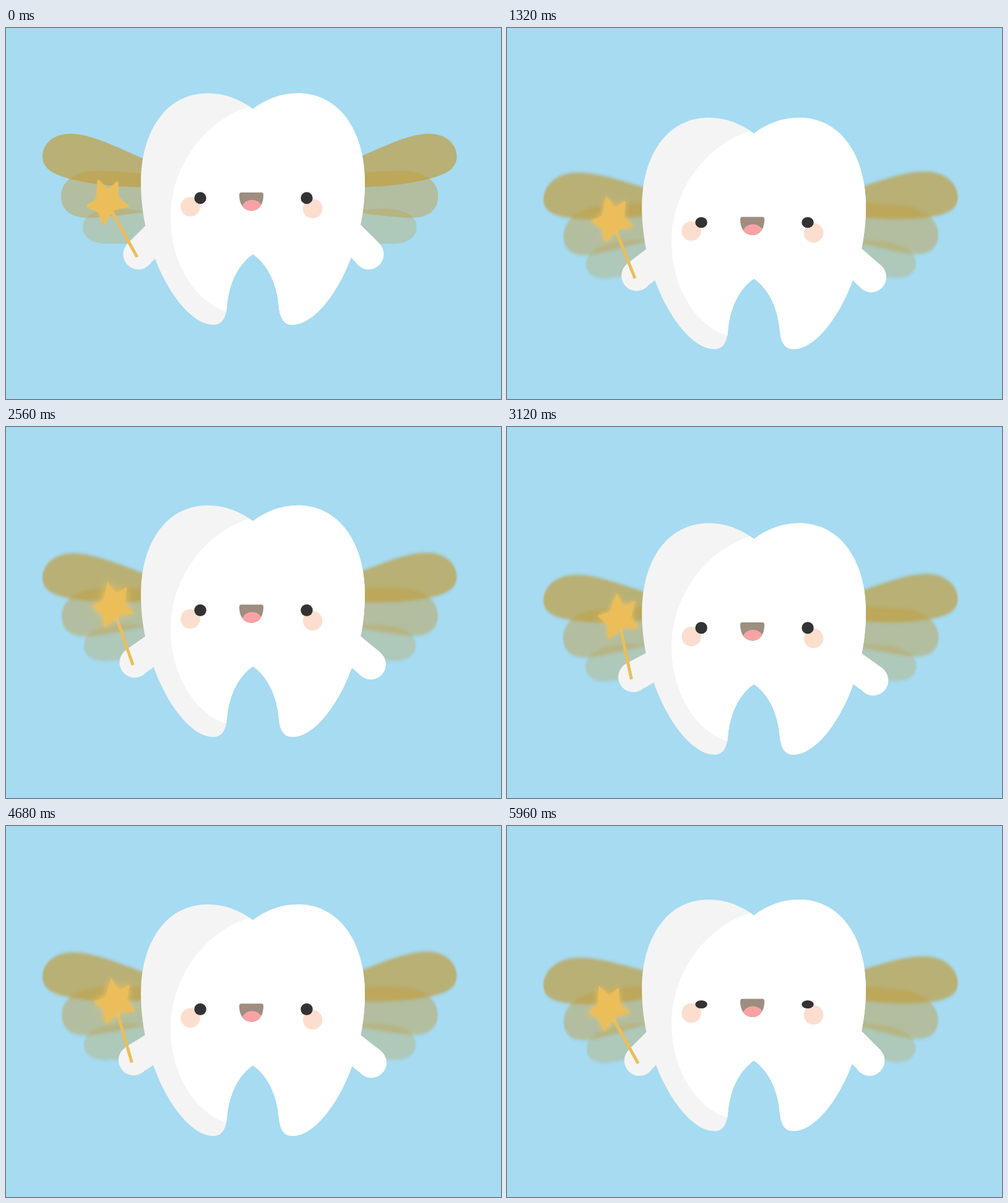
Write an HTML page that moves like this. It is 800 by 600 pixels and loops after 6 s.

```html
<!DOCTYPE html>
<html lang="en">
<head>
<meta charset="utf-8">
<title>Tooth fairy</title>
<style>
  html, body { margin: 0; width: 100%; height: 100%; overflow: hidden; background: #a6dbf1; }
  svg { display: block; width: 100vw; height: 100vh; }
</style>
</head>
<body>
<svg viewBox="0 0 800 600">
  <defs>
    <filter id="soft" x="-20%" y="-20%" width="140%" height="140%" color-interpolation-filters="sRGB">
      <feGaussianBlur id="blur" stdDeviation="0"/>
    </filter>
    <path id="tooth" d="M399 131C420 115 445 105.500 472 105.500C538 105.500 580 165 580 250
      C580 370 513 480 463 480C448 480 443 468 441 452C438 410 420 380 399 366
      C378 380 360 410 357 452C355 468 350 480 335 480C285 480 218 370 218 250
      C218 165 260 105.500 326 105.500C353 105.500 378 115 399 131Z"/>
    <path id="mouth" d="M380 266H413Q416 266 416 270C416 286 408 295.500 397 295.500
      C385 295.500 377 286 377 270Q377 266 380 266Z"/>
    <clipPath id="inTooth"><use href="#tooth"/></clipPath>
    <clipPath id="inMouth"><use href="#mouth"/></clipPath>
    <g id="wing" fill="#c09c3c">
      <path opacity=".3" d="M235 301C215 294 195 292 175 292C145 293 124 303 124 322C124 339 140 349 162 349H235Z"/>
      <path opacity=".45" d="M235 238C200 232 170 231 142 231C108 233 89 250 89 272C89 295 106 307 132 307C165 306 195 301 235 297Z"/>
      <path opacity=".685" d="M235 217C190 198 140 171 104 171C76 171 59 188 59 208C59 228 78 238 108 245C145 254 185 258 235 257Z"/>
    </g>
    <g id="arm">
      <path d="M196 349L228 317L262 350L236 378Z"/>
      <circle cx="214" cy="366" r="24.500"/>
    </g>
  </defs>

  <g id="fairy">
    <g filter="url(#soft)"><g id="wingL"><use href="#wing"/></g></g>
    <g filter="url(#soft)"><g id="wingR"><use href="#wing" transform="matrix(-1 0 0 1 787.500 0)"/></g></g>
    <g id="armR" fill="#fff"><use href="#arm" transform="matrix(-1 0 0 1 800 0)"/></g>
    <g id="armL">
      <use href="#arm" fill="#f4f4f4"/>
    </g>
    <use href="#tooth" fill="#f4f4f4"/>
    <path clip-path="url(#inTooth)" fill="#fff" d="M393 127C320 150 266 225 266 305C266 385 310 445 356 458L400 500H600V90H399Z"/>
    <g id="wand" fill="#ebbe59" stroke="#ebbe59" stroke-linejoin="round">
      <path stroke-width="5" d="M212 370.500L170 295"/>
      <path id="star" stroke-width="1.500" d="M149 246L165 262L180 249L181 275L198 288L174 294L157 318L150 297L131 288L147 277Z"/>
    </g>
    <g fill="#fcdecf">
      <circle cx="298" cy="289" r="15.800"/>
      <circle cx="495.500" cy="292" r="15.800"/>
    </g>
    <g fill="#333">
      <ellipse class="eye" cx="314" cy="275" rx="9.700"/>
      <ellipse class="eye" cx="486" cy="275" rx="9.700"/>
    </g>
    <use href="#mouth" fill="#9d8e80"/>
    <ellipse cx="397.500" cy="291" rx="16" ry="13" fill="#f7a3a6" clip-path="url(#inMouth)"/>
  </g>
</svg>
<script>
  const LOOP = 6000, BOB = 2120, WAVE = 2000, GLOW = 1800;
  const $ = id => document.getElementById(id);
  const eyes = document.querySelectorAll('.eye');
  const put = (id, value) => $(id).setAttribute('transform', value);

  // Sine ease from 0 to 1 between two times
  const ease = (t, from, to) => {
    const x = Math.min(1, Math.max(0, (t - from) / (to - from)));
    return (1 - Math.cos(Math.PI * x)) / 2;
  };

  // Shear with a slight turn: the tips sink, the lower wings draw in
  const sink = (id, q, slope, pivot, turn) =>
    put(id, `matrix(1 ${slope * q} ${turn * q} 1 ${-turn * q * 209} ${-slope * q * pivot})`);

  function draw(t) {
    const p = t % BOB, w = t % WAVE;
    put('fairy', `translate(0 ${50 * (ease(p, 0, 970) - ease(p, 970, BOB))})`);

    const lag = (p + BOB - 330) % BOB;
    const flap = .38 + .62 * (ease(lag, 0, 1670) - ease(lag, 1670, BOB));
    const q = Math.min(flap, t * .00069);
    sink('wingL', q, -.185, 272, .045);
    sink('wingR', q, .15, 495, -.03);
    const soft = Math.min(1, t / 80);
    $('blur').setAttribute('stdDeviation', `${1.2 * soft} ${2.8 * soft}`);

    const wave = ease(w, 0, 1050) - ease(w, 1050, 1535);
    const left = `rotate(${18 * wave} 248 328)`;
    put('armL', left);
    put('wand', left);
    put('armR', `rotate(${-10 * wave} 552 328)`);

    const glow = (1 - Math.cos(2 * Math.PI * t / GLOW)) / 2;
    $('star').style.filter = `drop-shadow(0 0 ${1.5 + 5.5 * glow}px #f3c565)`;

    const squint = ease(p, 1100, 1700) - ease(p, 2000, BOB);
    eyes.forEach(eye => eye.setAttribute('ry', 9.7 - 3.1 * squint));
  }

  let start;
  function tick(now) {
    start ??= now;
    draw((now - start) % LOOP);
    requestAnimationFrame(tick);
  }
  draw(0);
  requestAnimationFrame(tick);
</script>
</body>
</html>
```
